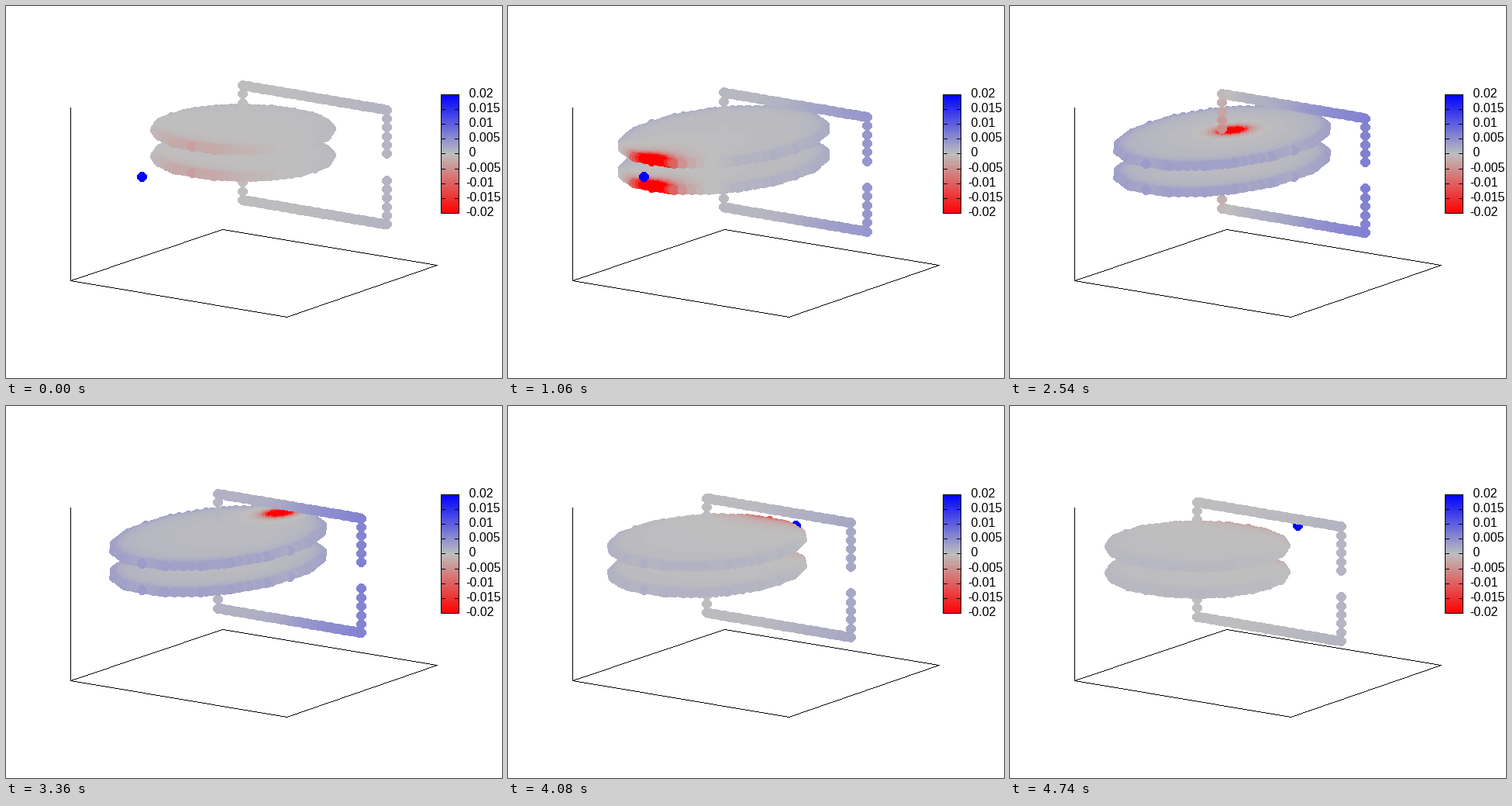
A matplotlib script that plays this animation: 640x480 px, repeating every 4.76 s.

```python
import numpy as np
import matplotlib.pyplot as plt
from matplotlib.animation import FuncAnimation

W, H = 640, 480
FRAMES, INTERVAL = 238, 20

# Capacitor: two round plates, each with a wire leading to an open gap
R = 5.0
GAP = 0.3
TOP = 1.3
STEP = 0.2
REACH = 2 * R
CHARGE = 4.5
LIMIT = 0.02

# Screen projection of the plot box
ORIGIN = np.array([83.2, 354.62])
X_AXIS = np.array([278.0, 47.3])
Y_AXIS = np.array([195.5, -66.0])
Z_BASE, Z_SPAN = 76.1, 147.8

DOT = 6
LEVELS = 257
WHITE, BLACK = LEVELS, LEVELS + 1

# Colour bar, in whole pixels
LEFT, RIGHT, BAR_TOP, BAR_END = 561, 584, 114, 267
TICK = 5
TICKS = np.linspace(BAR_TOP, BAR_END, 9).round().astype(int)


def make_palette():
    t = np.linspace(-1, 1, LEVELS)[:, None]
    gray = np.full(3, 190.0)
    ends = np.where(t < 0, [255.0, 0, 0], [0, 0, 255.0])
    ramp = gray + (ends - gray) * abs(t)
    return np.vstack([ramp, [[255] * 3, [0] * 3]]).round().astype(np.uint8)


def upper_half():
    """Points of the upper plate and wire, with an effective radius for each."""
    n = round(R / STEP)
    i, j = np.mgrid[-n:n + 1, -n:n + 1]
    inside = i**2 + j**2 <= n**2
    px, py = i[inside] * STEP, j[inside] * STEP
    plate = np.column_stack([px, py, np.full(px.size, GAP)])

    rise = GAP + STEP * np.arange(1, 6)
    run = STEP * np.arange(1, 2 * n + 1)
    drop = rise[::-1] - STEP
    wx = np.concatenate([0 * rise, run, 0 * drop + REACH])
    wz = np.concatenate([rise, 0 * run + TOP, drop])
    wire = np.column_stack([wx, 0 * wx, wz])

    radius = np.repeat([STEP / 12, STEP / 20], [len(plate), len(wire)])
    return np.vstack([plate, wire]), radius


def induced_charge(pts, radius, path):
    """Equilibrium charge of a neutral conductor for each place of the charge."""
    x, y, z = pts.T
    flat = (x[:, None] - x)**2 + (y[:, None] - y)**2
    near = np.sqrt(flat + (z[:, None] - z)**2)
    np.fill_diagonal(near, radius)
    mirror = np.sqrt(flat + (z[:, None] + z)**2)

    n = len(pts)
    system = np.ones((n + 1, n + 1))
    system[:n, :n] = 1 / near + 1 / mirror
    system[n, n] = 0
    outer = np.zeros((n + 1, len(path)))
    outer[:n] = -CHARGE / np.sqrt((x**2 + z**2)[:, None] + (y[:, None] - path)**2)
    return np.linalg.solve(system, outer)[:n].T


def to_level(values):
    t = np.clip(values / LIMIT, -1, 1)
    return np.round((t + 1) / 2 * (LEVELS - 1)).astype(np.int16)


def line(canvas, start, end):
    """One pixel wide line without smoothing."""
    (x0, y0), (x1, y1) = start, end
    n = max(abs(x1 - x0), abs(y1 - y0)) + 1
    xs = np.linspace(x0, x1, n).round().astype(int)
    ys = np.linspace(y0, y1, n).round().astype(int)
    canvas[ys, xs] = BLACK


def outline(canvas, corners):
    for start, end in zip(corners, corners[1:] + corners[:1]):
        line(canvas, start, end)


def make_backdrop():
    canvas = np.full((H, W), WHITE, dtype=np.int16)
    outline(canvas, [(83, 354), (362, 401), (556, 334), (279, 288)])
    line(canvas, (83, 354), (83, 131))

    ramp = np.linspace(LEVELS - 1, 0, BAR_END - BAR_TOP + 1).round()
    canvas[BAR_TOP:BAR_END + 1, LEFT:RIGHT + 1] = ramp[:, None]
    outline(canvas, [(LEFT, BAR_TOP), (RIGHT, BAR_TOP), (RIGHT, BAR_END), (LEFT, BAR_END)])
    for ty in TICKS:
        line(canvas, (LEFT, ty), (LEFT + TICK, ty))
        line(canvas, (RIGHT - TICK, ty), (RIGHT, ty))
    return canvas


palette = make_palette()
backdrop = make_backdrop()
path = -2 * R + 4 * R * np.arange(1, FRAMES + 1) / (FRAMES + 2)
half, radius = upper_half()
levels = to_level(induced_charge(half, radius, path))
body = np.vstack([half, half * [1, 1, -1], [[0, 0, 0]]])

dy, dx = np.mgrid[-DOT:DOT + 1, -DOT:DOT + 1]
disc = dx**2 + dy**2 <= 40
dx, dy = dx[disc], dy[disc]


def render(k):
    # The y range grows to keep the moving charge in view
    low, high = min(-R, path[k]), max(R, path[k])
    x, y, z = body.T.copy()
    y[-1] = path[k]
    a = (x + R) / (REACH + R)
    b = (y - low) / (high - low)
    base = ORIGIN + a[:, None] * X_AXIS + b[:, None] * Y_AXIS
    lift = (z + TOP) / (2 * TOP) * Z_SPAN
    order = np.argsort(lift + 16 * base[:, 1], kind="stable")

    cx = np.floor(base[:, 0]).astype(int)[order]
    cy = np.floor(base[:, 1] - Z_BASE - lift).astype(int)[order]
    shade = np.concatenate([levels[k], levels[k], [LEVELS - 1]])[order]
    canvas = backdrop.copy()
    canvas[cy[:, None] + dy, cx[:, None] + dx] = shade[:, None]
    return palette[canvas]


fig = plt.figure(figsize=(6.4, 4.8), dpi=100, facecolor="white")
ax = fig.add_axes([0, 0, 1, 1])
ax.axis("off")
picture = ax.imshow(render(0), extent=(0, W, H, 0), interpolation="nearest", aspect="auto")

for i, ty in enumerate(TICKS):
    value = LIMIT * (4 - i) / 4
    ax.text(593, ty + 4, f"{value: g}", family="Liberation Sans",
            fontsize=16 * 72 / fig.dpi, color="black", va="baseline", ha="left")


def update(k):
    picture.set_data(render(k))
    return [picture]


anim = FuncAnimation(fig, update, frames=FRAMES, interval=INTERVAL,
                     repeat=True, repeat_delay=0, blit=False)
plt.show()
```
